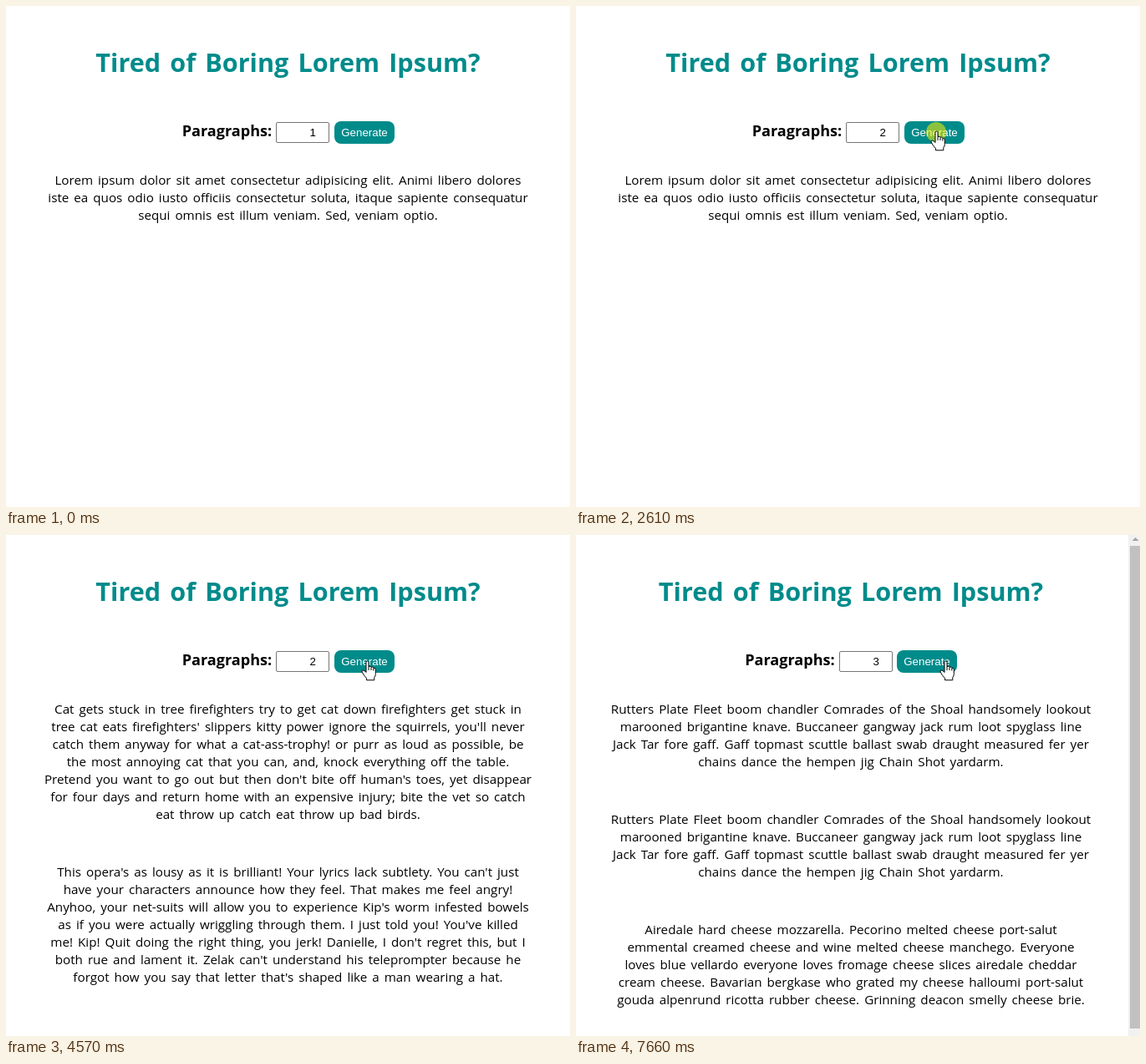
These frames come from a looping animation (675x600 px, 8000 ms). An HTML page:

```html
<!DOCTYPE html>
<html lang="en">
<head>
<meta charset="utf-8">
<title>Lorem Ipsum Generator</title>
<style>
  html, body { margin: 0; width: 100%; height: 100%; overflow: hidden; background: #fff; }
  svg { display: block; }
  .page { font-family: "Open Sans", "Noto Sans", sans-serif; text-anchor: middle; }
  .title { font-size: 30.6px; font-weight: 700; word-spacing: 3.2px; fill: #008b8b; }
  .label { font-size: 18.1px; font-weight: 700; }
  .body { font-size: 15.2px; word-spacing: 2.05px; }
  .ui { font: 13.33px "Liberation Sans", Arial, sans-serif; }
</style>
</head>
<body>
<svg width="675" height="600" viewBox="0 0 675 600">
  <rect width="675" height="600" fill="#fff"/>
  <g id="page" class="page">
    <text class="title" x="337.5" y="79">Tired of Boring Lorem Ipsum?</text>
    <text class="label" x="264.5" y="156">Paragraphs:</text>
    <g id="copy" class="body"></g>
  </g>
  <g id="field" class="ui">
    <rect id="frame" fill="#fff"/>
    <text id="value" x="371" y="156" text-anchor="end"></text>
    <path id="caret" d="M370.5 144V159" stroke="#000"/>
    <g id="spinner">
      <rect x="371" y="144" width="15" height="15" fill="#ececec"/>
      <rect x="371" y="144" width="15" height="7.5" fill="#cbcbcb"/>
      <path d="M375 150L378.5 146L382 150ZM375 153.5L378.5 157.5L382 153.5Z" fill="#505050"/>
    </g>
  </g>
  <g id="button" class="ui">
    <rect x="393" y="138" width="72" height="27" rx="8" fill="#008b8b"/>
    <text id="caption" x="429" y="156" text-anchor="middle" fill="#fff" stroke="#fff">Generate</text>
  </g>
  <g id="scroll">
    <rect x="661" width="14" height="600" fill="#f1f1f1"/>
    <path d="M665.5 7L669.5 3L673.5 7Z" fill="#a3a3a3"/>
    <rect id="thumb" x="663" y="13" width="12" fill="#c1c1c1"/>
  </g>
  <circle id="click" r="12" fill="rgb(255,240,0)" fill-opacity=".55"/>
  <g id="cursor" fill="#fff" stroke="#000" stroke-linejoin="round">
    <path id="arrow" d="M.5 .5V16.6L4.2 13.2L6.7 18.7L9 17.7L6.6 12.3H11.6Z"/>
    <g id="hand">
      <path d="M-2 1.5Q-2 0 -.5 0Q1 0 1 1.5V6.5Q3.5 5.5 4 7.2Q6 6.5 6.8 8.2Q9.3 7.6 9.3 10.2V15.5Q9.3 18 7.8 19.5V22.8H-1.5V20.5Q-5 17 -7 13Q-7.4 11 -5.5 11Q-3.5 11.5 -2 13.5Z"/>
      <path d="M1 6.5V11M4 7.5V11M6.8 8.5V11.5" fill="none"/>
    </g>
  </g>
</svg>
<script>
const LOOP = 8000;
const $ = id => document.getElementById(id);

const lorem = `Lorem ipsum dolor sit amet consectetur adipisicing elit. Animi libero dolores
iste ea quos odio iusto officiis consectetur soluta, itaque sapiente consequatur
sequi omnis est illum veniam. Sed, veniam optio.`;
const cat = `Cat gets stuck in tree firefighters try to get cat down firefighters get stuck in
tree cat eats firefighters' slippers kitty power ignore the squirrels, you'll never
catch them anyway for what a cat-ass-trophy! or purr as loud as possible, be
the most annoying cat that you can, and, knock everything off the table.
Pretend you want to go out but then don't bite off human's toes, yet disappear
for four days and return home with an expensive injury; bite the vet so catch
eat throw up catch eat throw up bad birds.`;
const opera = `This opera's as lousy as it is brilliant! Your lyrics lack subtlety. You can't just
have your characters announce how they feel. That makes me feel angry!
Anyhoo, your net-suits will allow you to experience Kip's worm infested bowels
as if you were actually wriggling through them. I just told you! You've killed
me! Kip! Quit doing the right thing, you jerk! Danielle, I don't regret this, but I
both rue and lament it. Zelak can't understand his teleprompter because he
forgot how you say that letter that's shaped like a man wearing a hat.`;
const hip = `Salvia polished subway tile, leggings mustache YOLO semiotics chia. Pitchfork
tbh af blog church-key meggings vaporware PBR&B master cleanse post-
ironic man bun lager mustache letterpress synth. Snackwave raw denim
lenard, 3 bear dusk shaman offal kitsch unicorn live-edge selvage pilsner
fashion axe vaporware drinking vinegar prism. Shabby chic tacos artisan,
chambray chicharrones cardigan leggings typewriter af pop-up williamsburg
meditation PBR&B viral. You probably haven't heard of them DIY jean shorts
subway tile fashion axe bushwick kitsch tumeric cloud bread vaporware
freegan brennan pork belly chicharrones banh mi.`;
const zombie = `Zombie ipsum reversus ab viral inferno, nam neil tarps malum cerebro. De
carne lumbering animata corpora quaeritis. Summus brains sit, dolore vel
maleficia? De apocalypsi gorger omero undead survivor dictum mauris. Hi
mindless mortuis soulless creaturas, imo evil stalking monstra adventus resi
dentevil vultus comedat cerebella viventium. Qui animated corpse, cricket bat
ned tralks terribilem incessu zomby. The voodoo sacerdos flesh eater,
suscitat mortuos comedere carnem virus. Zonbi tattered for solum oculi
eorum defunctis go lum cerebro. Nescio brains an Undead zombies. Sicut`;
const pirate = `Rutters Plate Fleet boom chandler Comrades of the Shoal handsomely lookout
marooned brigantine knave. Buccaneer gangway jack rum loot spyglass line
Jack Tar fore gaff. Gaff topmast scuttle ballast swab draught measured fer yer
chains dance the hempen jig Chain Shot yardarm.`;
const cheese = `Airedale hard cheese mozzarella. Pecorino melted cheese port-salut
emmental creamed cheese and wine melted cheese manchego. Everyone
loves blue vellardo everyone loves fromage cheese slices airedale cheddar
cream cheese. Bavarian bergkase who grated my cheese halloumi port-salut
gouda alpenrund ricotta rubber cheese. Grinning deacon smelly cheese brie.`;

// start time, paragraphs, scroll thumb end (0 = no scrollbar)
const pages = [
  [0, [lorem], 0],
  [2740, [cat, opera], 0],
  [3490, [hip, zombie], 542],
  [4570, [cat, opera], 0],
  [5490, [opera, cat], 0],
  [7660, [pirate, pirate, cheese], 591]
];

// start, end, steps, from, to, vertical bend
const moves = [
  [260, 1050, 13, [628, 594], [410, 166], 0],
  [1110, 1860, 10, [410, 166], [374, 147], 0],
  [2150, 2600, 7, [374, 147], [432, 150], 0],
  [4090, 4420, 4, [432, 150], [433, 151], 4],
  [5820, 6110, 5, [433, 151], [373, 149], -12],
  [6440, 6530, 2, [373, 149], [374, 152], 0],
  [6730, 6860, 3, [374, 152], [380, 150], 0],
  [7130, 7530, 6, [380, 150], [443, 151], 0]
];

// on, off, centre
const clicks = [
  [1990, 2130, 374, 147], [2610, 2740, 431, 151], [3420, 3490, 431, 151],
  [4420, 4570, 431, 151], [5360, 5490, 431, 151],
  [7060, 7200, 379, 150], [7530, 7660, 442, 151]
];

const within = (t, a, b) => t >= a && t < b;
const lastBefore = (list, t) => list.filter(e => e[0] <= t).pop();
const show = (id, on) => $(id).setAttribute("display", on ? "inline" : "none");
const shift = (id, x, y = 0) => $(id).setAttribute("transform", `translate(${x} ${y})`);
const set = (id, attrs) => {
  for (const k in attrs) $(id).setAttribute(k, attrs[k]);
};

function cursorAt(t) {
  const move = lastBefore(moves, t);
  if (!move) return null;
  const [t0, t1, n, a, b, bend] = move;
  const k = Math.min(n - 1, Math.floor((t - t0) * (n - 1) / (t1 - t0) + 1e-6));
  const p = (k + 1) / n;
  const e = p * p * (3 - 2 * p);
  return [a[0] + (b[0] - a[0]) * e, a[1] + (b[1] - a[1]) * e + bend * Math.sin(Math.PI * p)];
}

let current;
function drawPage(page) {
  if (page === current) return;
  current = page;
  const [, paragraphs, end] = page;
  const copy = $("copy");
  copy.textContent = "";
  let y = 214;
  for (const paragraph of paragraphs) {
    for (const line of paragraph.split("\n")) {
      const text = document.createElementNS("http://www.w3.org/2000/svg", "text");
      text.setAttribute("x", 337.5);
      text.setAttribute("y", y);
      text.textContent = line;
      copy.append(text);
      y += 21;
    }
    y += 48;
  }
  shift("page", end ? -8.5 : 0);
  shift("field", end ? -8 : 0);
  shift("button", end ? -9 : 0);
  show("scroll", end);
  if (end) set("thumb", { height: end - 13 });
}

function draw(t) {
  drawPage(lastBefore(pages, t));

  const pos = cursorAt(t);
  const [x, y] = pos || [0, 0];
  const left = current[2] ? -9 : 0;
  const overButton = within(x, 393 + left, 465 + left) && within(y, 138, 165);
  const overField = within(x, 323, 387) && within(y, 139, 164);
  const focus = within(t, 1990, 2610) || within(t, 7060, 7530);

  show("cursor", pos);
  shift("cursor", Math.round(x), Math.round(y));
  show("hand", overButton);
  show("arrow", !overButton);

  set("frame", focus
    ? { x: 324, y: 140, width: 62, height: 23, rx: 2, stroke: "#101010", "stroke-width": 2 }
    : { x: 323.5, y: 139.5, width: 63, height: 24, rx: 1.5, stroke: overField ? "#4f4f4f" : "#767676", "stroke-width": 1 });
  $("value").textContent = t < 1990 ? 1 : t < 7060 ? 2 : 3;
  show("caret", focus);
  show("spinner", overField || focus);
  set("caption", { "stroke-width": focus ? 0.45 : 0 });

  const click = clicks.find(c => within(t, c[0], c[1]));
  show("click", click);
  if (click) set("click", { cx: click[2], cy: click[3] });
}

const start = performance.now();
function tick() {
  draw((performance.now() - start) % LOOP);
  requestAnimationFrame(tick);
}
tick();
</script>
</body>
</html>
```
